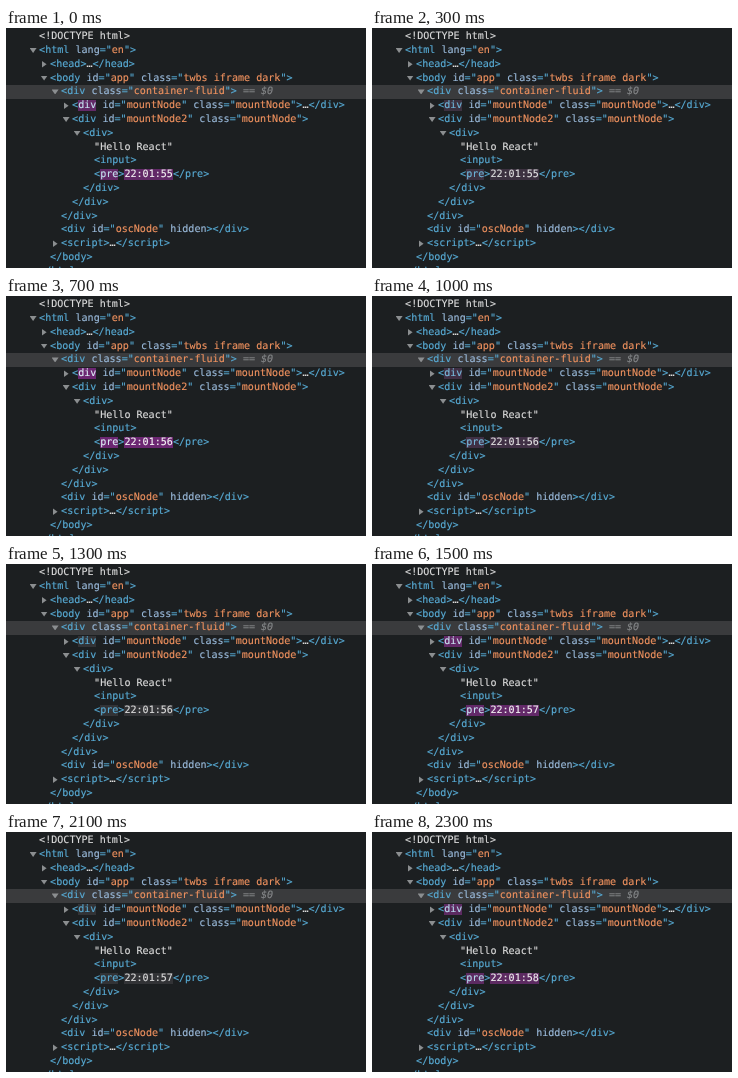
An HTML page that plays this animation: 360 by 240 pixels, repeating every 2.4 s.

```html
<!DOCTYPE html>
<html lang="en">
<head>
<meta charset="utf-8">
<style>
  html, body { margin: 0; width: 100%; height: 100%; overflow: hidden; background: #1c1f21; }
  #tree {
    position: relative; width: 360px; height: 240px; overflow: hidden;
    font: 10.07px/13.8px "DejaVu Sans Mono", "Noto Sans Mono", monospace;
    text-rendering: geometricPrecision; -webkit-text-stroke: .15px; color: #58acd6;
  }
  .row { position: absolute; white-space: pre; }
  .selected { position: absolute; left: 0; top: 57px; width: 360px; height: 14px; background: #3a3b3d; }
  .name { color: #9bbbdc; }
  .value { color: #f0925f; }
  .text { color: #dcdcdc; }
  .hint { color: #858789; font-style: italic; }
  .arrow { position: absolute; background: #8b8e90; }
  .open { width: 7px; height: 5px; clip-path: polygon(0 0, 100% 0, 50% 100%); }
  .shut { width: 5px; height: 7px; clip-path: polygon(0 0, 100% 50%, 0 100%); }
</style>
</head>
<body>
<div id="tree"><div class="selected"></div></div>
<script>
const LOOP = 2400, STEP = 100, TICK = 755, LEAD = 120, FADE = 700;
const tree = document.getElementById('tree');

// [indent level, arrow, markup]; braces mark the parts that flash
const rows = [
  [0, '', '<!DOCTYPE html>'],
  [0, 'open', '<html lang="en">'],
  [1, 'shut', '<head>…</head>'],
  [1, 'open', '<body id="app" class="twbs iframe dark">'],
  [2, 'open', '<div class="container-fluid"> == $0'],
  [3, 'shut', '<{div} id="mountNode" class="mountNode">…</div>'],
  [3, 'open', '<div id="mountNode2" class="mountNode">'],
  [4, 'open', '<div>'],
  [5, '', '"Hello React"'],
  [5, '', '<input>'],
  [5, '', '<{pre}>{22:01:55}</pre>'],
  [4, '', '</div>'],
  [3, '', '</div>'],
  [2, '', '</div>'],
  [2, '', '<div id="oscNode" hidden></div>'],
  [2, 'shut', '<script>…<\/script>'],
  [1, '', '</body>'],
  [0, '', '</html>']
];

function add(parent, tag, cls, text = '') {
  const el = document.createElement(tag);
  el.className = cls;
  el.textContent = text;
  return parent.appendChild(el);
}

function kind(part) {
  if (part[0] === '{') return 'flash';
  if (part === '== $0') return 'hint';
  if (/^(<!|"Hello|…)/.test(part)) return 'text';
  return /^(id|class|lang|hidden)$/.test(part) ? 'name' : 'value';
}

const tokens = /(\{[^}]+\}|<!.+|"Hello.+|…|== \$0|\w+(?==")|hidden|(?<==")[^"]+)/;

rows.forEach(([level, arrow, markup], i) => {
  const x = 33.1 + 11 * level, y = 2.2 + 13.8 * i;
  const row = add(tree, 'div', 'row');
  row.style.left = x + 'px';
  row.style.top = y + 'px';
  markup.split(tokens).forEach((part, n) => {
    if (part) add(row, 'span', n % 2 ? kind(part) : '', part.replace(/[{}]/g, ''));
  });
  if (arrow) {
    const mark = add(tree, 'div', 'arrow ' + arrow);
    mark.style.left = x - (arrow === 'open' ? 9.5 : 8.5) + 'px';
    mark.style.top = y + (arrow === 'open' ? 4 : 3) + 'px';
  }
});

const flashes = [...document.querySelectorAll('.flash')];
const clock = flashes[2];
const mix = (from, to, p) => `color-mix(in srgb, ${to} ${p * 100}%, ${from})`;

function draw(now) {
  const t = Math.floor(now % LOOP / STEP) * STEP + LEAD;
  const p = Math.min(1, t % TICK / FADE);
  const faded = 1 - (1 - p) ** 2.2;
  clock.textContent = '22:01:' + (55 + Math.floor(t / TICK));
  for (const el of flashes) {
    el.style.background = mix('#7a2480', '#323336', faded);
    el.style.color = mix('#ffffff', el === clock ? '#dcdcdc' : '#58acd6', faded);
  }
}

const start = performance.now();
function frame() {
  draw(performance.now() - start);
  requestAnimationFrame(frame);
}
frame();
</script>
</body>
</html>
```
